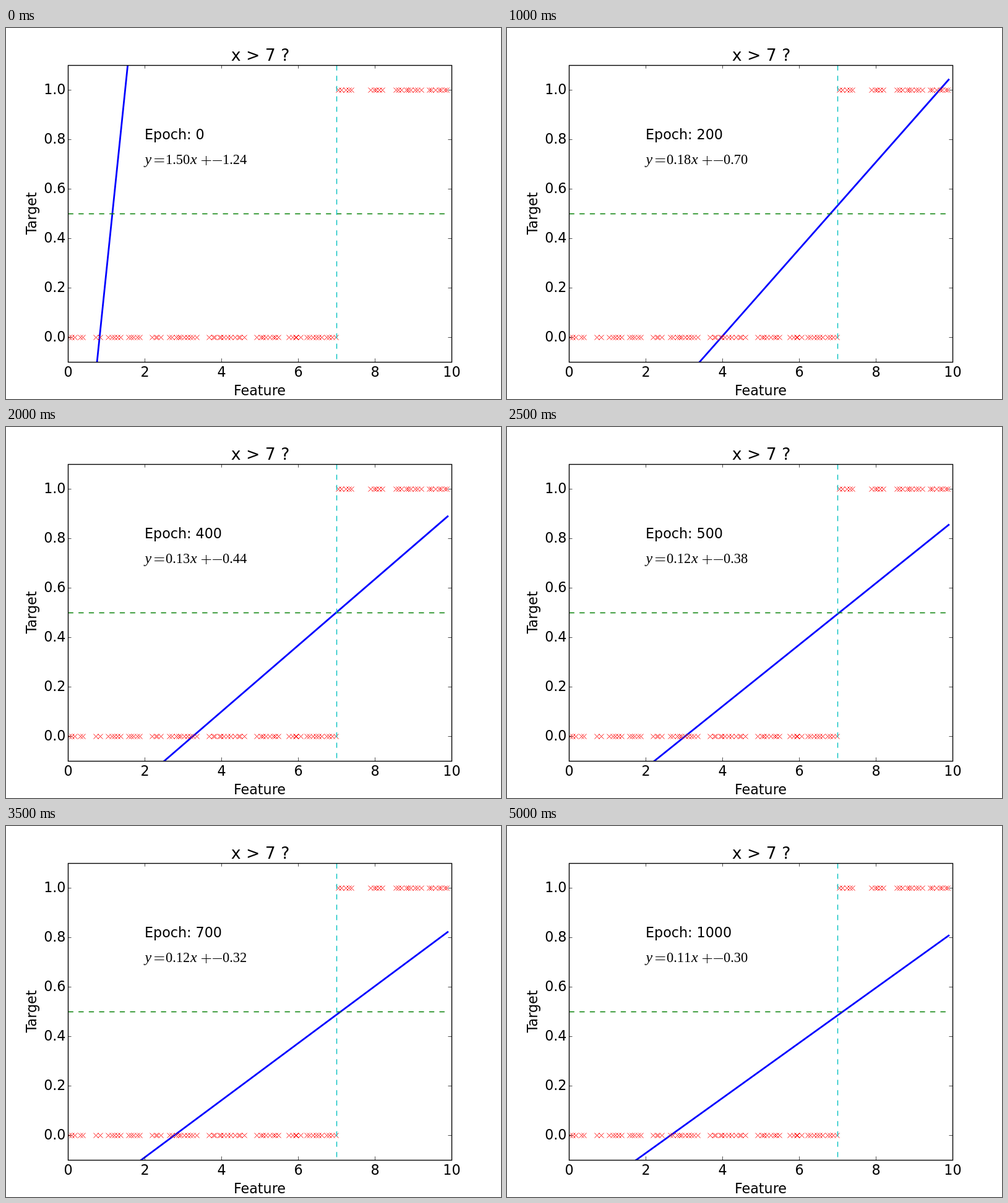
These frames come from a looping animation (800 px wide and 600 px high, 5500 ms). An HTML page with a canvas:

```html
<!DOCTYPE html>
<html lang="en">
<head>
<meta charset="utf-8">
<title>Linear fit</title>
<style>
  html, body { margin: 0; width: 100%; height: 100%; overflow: hidden; background: #fff; }
  canvas { display: block; }
</style>
</head>
<body>
<canvas id="plot" width="800" height="600"></canvas>
<script>
const ctx = document.getElementById('plot').getContext('2d');
const SANS = '"DejaVu Sans", sans-serif';
const SERIF = '"Liberation Serif", serif';
const PT = 100 / 72; // pixels per point
const STEP = 500, STEPS = 11;

const px = x => 100 + 62 * x;
const py = y => 500 - 400 * y;

// Small seeded generator (mulberry32)
function seeded(seed) {
  return () => {
    seed = seed + 0x6D2B79F5 | 0;
    let t = Math.imul(seed ^ seed >>> 15, 1 | seed);
    t = t + Math.imul(t ^ t >>> 7, 61 | t) ^ t;
    return ((t ^ t >>> 14) >>> 0) / 2 ** 32;
  };
}

// Samples cluster in a few stretches of the axis, about 5 px apart
const random = seeded(7);
const clusters = [
  [102, 124], [145, 152], [165, 185], [198, 216], [236, 250], [264, 308], [328, 385],
  [405, 440], [457, 476], [486, 533], [537, 558], [589, 608], [630, 671], [684, 712]
];
const samples = clusters.flatMap(([from, to]) => {
  const n = Math.round((to - from) / 5);
  return Array.from({ length: n + 1 }, (_, i) => {
    const jitter = i % n ? 4 * random() - 2 : 0;
    return Math.round(from + (to - from) * i / n + jitter);
  });
});
const crosses = samples.flatMap(left => {
  const x = left + 0.5, y = py(left > px(7) ? 1 : 0) + 0.5;
  return [[x - 4, y - 4, x + 4, y + 4], [x - 4, y + 4, x + 4, y - 4]];
});

function stroke(color, width, segments, dash = []) {
  ctx.strokeStyle = color;
  ctx.lineWidth = width;
  ctx.setLineDash(dash);
  ctx.beginPath();
  for (const [x1, y1, x2, y2] of segments) {
    ctx.moveTo(x1, y1);
    ctx.lineTo(x2, y2);
  }
  ctx.stroke();
}

function text(str, x, y, align = 'left', font = 16 * PT + 'px ' + SANS) {
  ctx.font = font;
  ctx.textAlign = align;
  ctx.fillText(str, x, y);
}

// Slope and intercept converge geometrically after the first step
function fit(k) {
  if (k === 0) return [1.5, -1.24];
  const r = 0.6 ** k;
  return [0.1103 + 0.182 * r, -0.289 - 1.14 * r];
}

function drawData(m, b) {
  const dash = [6 * PT, 6 * PT];
  ctx.save();
  ctx.beginPath();
  ctx.rect(100, 60, 620, 480);
  ctx.clip();
  ctx.lineCap = 'square';
  stroke('#00f', 2 * PT, [[px(0), py(b), px(9.9), py(9.9 * m + b)]]);
  ctx.lineCap = 'butt';
  stroke('#007f00', PT, [[100.5, 300.5, px(9.9), 300.5]], dash);
  stroke('#f00', 0.9, crosses);
  stroke('#00bfbf', PT, [[534.5, 60.5, 534.5, 540.5]], dash);
  ctx.restore();
}

function drawAxes() {
  const len = 4 * PT, ticks = [];
  for (let i = 0; i <= 5; i++) {
    const x = px(2 * i) + 0.5, y = py(i / 5) + 0.5;
    ticks.push([x, 60, x, 60 + len], [x, 540, x, 540 - len],
               [100, y, 100 + len, y], [720, y, 720 - len, y]);
    text(2 * i, x, 564, 'center');
    text((i / 5).toFixed(1), 96.5, y + 6.5, 'right');
  }
  stroke('#000', PT / 2, ticks);
  ctx.lineWidth = PT;
  ctx.strokeRect(100.5, 60.5, 620, 480);

  text('x > 7 ?', 411, 53, 'center', 19.2 * PT + 'px ' + SANS);
  text('Feature', 410, 594, 'center');
  ctx.save();
  ctx.translate(49, 300);
  ctx.rotate(-Math.PI / 2);
  text('Target', 0, 0, 'center');
  ctx.restore();
}

function drawEquation(m, b) {
  const digits = '22.4px ' + SERIF, letters = 'italic 24px ' + SERIF;
  ctx.save();
  ctx.fontKerning = 'none';
  text('y', 224.5, 220, 'left', letters);
  text(m.toFixed(2), 258, 220, 'left', digits);
  text('x', 298, 220, 'left', letters);
  text(Math.abs(b).toFixed(2), 350, 220, 'left', digits);
  ctx.restore();
  // Thin operators: = + −
  stroke('#000', 1, [
    [240, 211.5, 255.5, 211.5], [240, 216.5, 255.5, 216.5],
    [316, 214.5, 331.5, 214.5], [323.5, 207, 323.5, 222],
    [334, 214.5, 349, 214.5]
  ]);
}

function draw(time) {
  const k = Math.floor(time / STEP) % STEPS;
  const [m, b] = fit(k);
  ctx.fillStyle = '#fff';
  ctx.fillRect(0, 0, 800, 600);
  ctx.fillStyle = '#000';
  drawData(m, b);
  drawAxes();
  text('Epoch: ' + 100 * k, 224, 180);
  drawEquation(m, b);
}

const start = performance.now();
function loop() {
  draw(performance.now() - start);
  requestAnimationFrame(loop);
}
loop();
</script>
</body>
</html>
```
